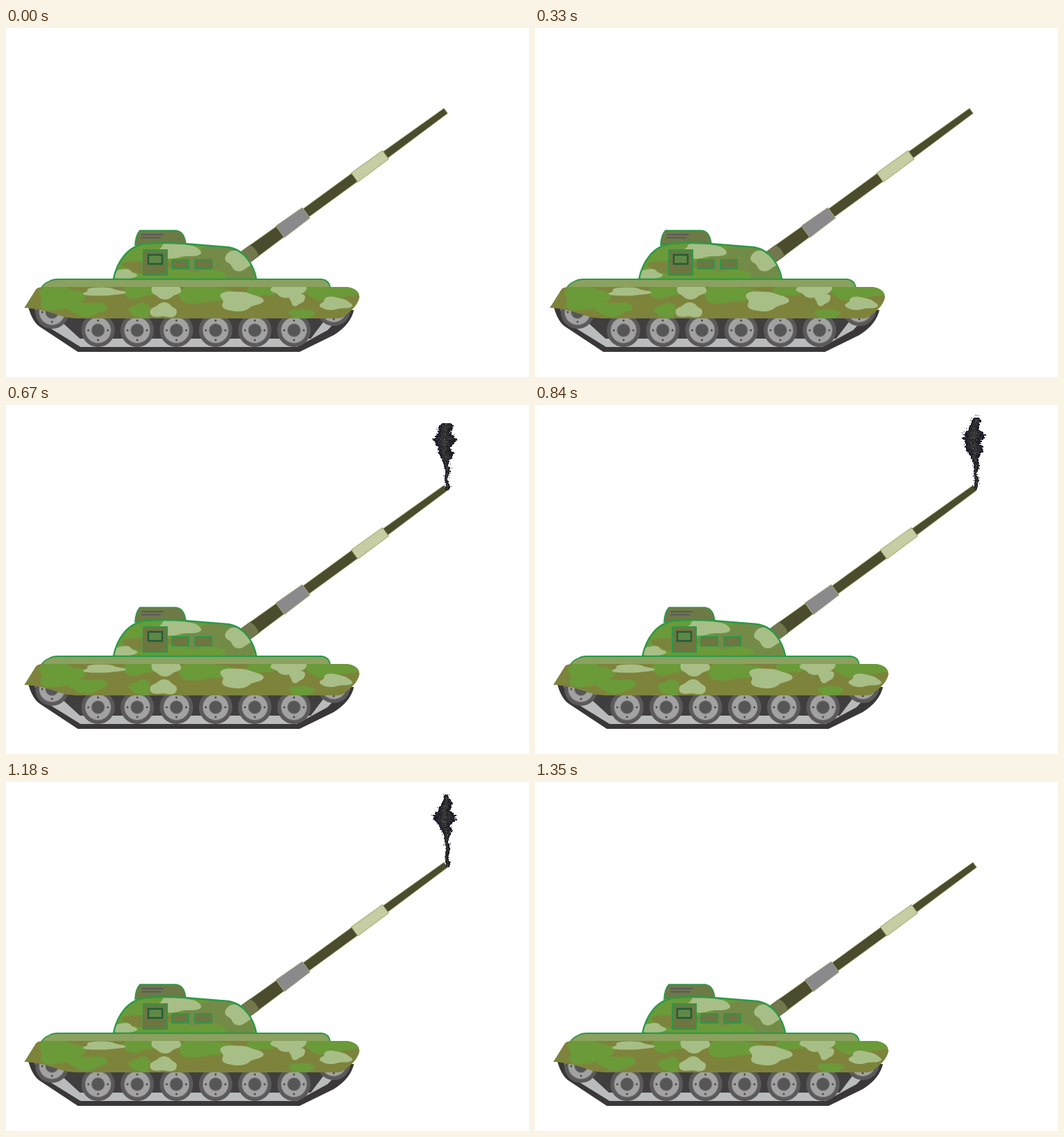
These frames come from a looping animation (750x500 px, 1.38 s). An HTML page with a canvas:

```html
<!DOCTYPE html>
<html lang="en">
<head>
<meta charset="utf-8">
<title>Tank firing</title>
<style>
  html, body { margin: 0; width: 100%; height: 100%; overflow: hidden; background: #fff; }
  svg, canvas { position: absolute; left: 0; top: 0; width: 750px; height: 500px; }
</style>
</head>
<body>
<svg viewBox="0 0 750 500">
  <defs>
    <path id="skirt" d="M26 401L43 374Q46 371 52 371H486C500 371 507 378 507 386C505 396 497 405 482 415Q480 416 474 416H100C76 416 64 403 26 401Z"/>
    <path id="dome" d="M154 360C159 336 174 311 202 309Q225 307 256 309L318 314C343 317 356 342 359 360Z"/>
    <clipPath id="skirtClip"><use href="#skirt"/></clipPath>
    <clipPath id="domeClip"><use href="#dome"/></clipPath>
    <g id="wheel">
      <circle r="24" fill="#5b595a"/>
      <circle r="18.5" fill="#a2a2a3" stroke="#777677"/>
      <circle r="9.5" fill="#575656" stroke="#8a898a"/>
      <circle r="14" fill="none" stroke="#4a4849" stroke-width="3" stroke-linecap="round" pathLength="4" stroke-dasharray="0 1"/>
    </g>
  </defs>

  <g id="tank">
    <g transform="translate(356 319) rotate(-36.1)" stroke="#a9aa70" stroke-width=".8">
      <path fill="#4a4c2d" d="M0 -10L46 -9.400V9.400L0 10ZM92 -7.200H178V7.200H92ZM233 -5.700L340 -4.500V4.500L233 5.700Z"/>
      <path fill="#8a898c" d="M46 -10.300L92 -9.300V9.300L46 10.300Z"/>
      <path fill="#c6cda3" stroke="#8f9650" d="M178 -8L233 -7.500V7.500L178 8Z"/>
      <path fill="#72784c" stroke="#55592f" d="M-20 -10L0 -10Q5 0 1 10L-20 10Z"/>
    </g>

    <path fill="#3a3738" d="M32 400Q38 422 50 429L103 464H421L470 440Q494 425 499 404Z"/>
    <path fill="#b9bbbc" d="M41 403L52 423L107 457H417L461 433L486 407Z"/>
    <path fill="#403e3f" d="M70 412H462L437 445H106Z"/>
    <use href="#wheel" x="66" y="407"/>
    <use href="#wheel" x="470" y="403"/>
    <g id="wheels"></g>

    <path fill="#6d7a45" stroke="#2b9a48" stroke-width="1.6" d="M185 311Q186 296 192 290H244C254 291 257 301 258 310Z"/>
    <path stroke="#5b5665" stroke-width="2" d="M194 296H226M194 300.500H222"/>

    <g id="domeCamo" clip-path="url(#domeClip)"><use href="#dome" fill="#6b9a39"/></g>
    <use href="#dome" fill="none" stroke="#2b9a48" stroke-width="2.4"/>
    <g fill="#6d7641" stroke="#2f9548" stroke-width="2">
      <path d="M197 318H231V354H197ZM238 332H262V345H238ZM271 332H295V345H271Z"/>
      <path fill="#5f8746" stroke="#205c35" stroke-width="2.4" d="M204 325H224V338H204Z"/>
    </g>

    <path fill="#8ba15f" stroke="#2b9a48" stroke-width="1.8" d="M51 372Q54 366 62 363Q67 360 74 360H453Q463 361 465 372Z"/>
    <g id="skirtCamo" clip-path="url(#skirtClip)"><use href="#skirt" fill="#7e833b"/></g>
  </g>
</svg>
<canvas id="smoke" width="750" height="500"></canvas>

<script>
const LOOP = 1380, MUZZLE = 122;
const GREEN = '#6b9a39', LIGHT = '#a8be87', OLIVE = '#7c833c', MOSS = '#748b48';
const byId = id => document.getElementById(id);
const ctx = byId('smoke').getContext('2d');

function add(parent, tag, attrs) {
  const el = document.createElementNS('http://www.w3.org/2000/svg', tag);
  for (const name in attrs) el.setAttribute(name, attrs[name]);
  byId(parent).append(el);
}

// A wavy oval patch of camouflage.
function patch(parent, fill, x, y, rx, ry) {
  const points = [];
  for (let a = 0; a < 2 * Math.PI; a += 0.1) {
    const r = 1 + 0.14 * Math.sin(3 * a + x) + 0.06 * Math.sin(5 * a + y);
    points.push([x + rx * r * Math.cos(a), y + ry * r * Math.sin(a)]);
  }
  add(parent, 'polygon', { fill, points: points.join(' ') });
}

for (let i = 0; i < 6; i++) add('wheels', 'use', { href: '#wheel', x: 132 + 56.2 * i, y: 433 });

patch('domeCamo', MOSS, 312, 338, 52, 30);
patch('domeCamo', OLIVE, 205, 342, 34, 11);
patch('domeCamo', GREEN, 288, 355, 30, 8);
patch('domeCamo', LIGHT, 246, 319, 31, 11);
patch('domeCamo', LIGHT, 170, 353, 16, 7);
patch('domeCamo', LIGHT, 336, 332, 21, 14);

patch('skirtCamo', GREEN, 77, 386, 32, 18);
patch('skirtCamo', GREEN, 116, 402, 28, 10);
patch('skirtCamo', GREEN, 190, 376, 24, 11);
patch('skirtCamo', GREEN, 193, 405, 15, 11);
patch('skirtCamo', GREEN, 284, 381, 40, 13);
patch('skirtCamo', GREEN, 365, 375, 20, 10);
patch('skirtCamo', GREEN, 467, 376, 43, 13);
patch('skirtCamo', GREEN, 424, 411, 17, 9);
patch('skirtCamo', LIGHT, 139, 378, 28, 6);
patch('skirtCamo', LIGHT, 229, 377, 21, 10);
patch('skirtCamo', LIGHT, 226, 405, 19, 10);
patch('skirtCamo', LIGHT, 335, 391, 29, 14);
patch('skirtCamo', LIGHT, 405, 376, 25, 9);
patch('skirtCamo', LIGHT, 417, 388, 11, 9);
patch('skirtCamo', LIGHT, 472, 395, 22, 9);

function random(seed) {
  return () => (seed = seed * 16807 % 2147483647) / 2147483647;
}

// Speckled column: shape(y) gives [centre, half width], color(depth, rnd) its tone.
function plume(top, bottom, shape, color, seed) {
  const rnd = random(seed);
  const dot = (x, y, size, depth) => {
    ctx.fillStyle = color(depth, rnd());
    ctx.fillRect(Math.round(x), Math.round(y), size, size);
  };
  for (let y = top; y < bottom; y++) {
    const [x, w] = shape(y);
    const edge = w * (0.8 + rnd() * 0.3);
    for (let d = -edge; d < edge; d++) dot(x + d, y, rnd() < 0.5 ? 1 : 2, 1 - Math.abs(d) / edge);
    if (rnd() < 0.5) dot(x + (rnd() - 0.5) * (w * 2 + 6), y - rnd() * 5, 1, 0);
  }
}

const soot = (depth, r) => {
  const l = 18 + 48 * depth * r + 22 * r;
  return `rgb(${l + 3} ${l + 4 * depth} ${l + 14 * (1 - depth)})`;
};
const ember = (depth, r) => `rgb(${180 + 65 * r} ${85 + 70 * r + 60 * depth} ${45 + 75 * depth})`;

const billow = y => {
  const a = 2 * Math.PI * (y - 18) / 37;
  return [627 + 6 * Math.cos(a), 10.5 + 4.5 * Math.cos(a)];
};
const flame = y => [632 + Math.sin(y / 4), 1 + 4 * Math.sin(Math.PI * (y - 88) / 35)];
const wisp = age => y => {
  const body = Math.exp(-(((y - 50) / (25 - 2 * age)) ** 2));
  const ripple = Math.sin(y / 3.5 + age * 2);
  return [632 - 4 * body + ripple, (2 + 11.5 * body) * (1 + 0.22 * ripple)];
};

function show(phase) {
  byId('tank').setAttribute('transform', `translate(${phase === 1 ? -5 : 0} 0)`);
  ctx.clearRect(0, 0, 750, 500);
  if (phase === 2) {
    plume(1, 101, billow, soot, 71);
    plume(89, MUZZLE, flame, ember, 23);
  } else if (phase > 2 && phase < 7) {
    const age = phase - 3;
    plume(22 + 4 * Math.cos(Math.PI * age), MUZZLE - 1, wisp(age), soot, phase * 997);
  }
}

let current = -1;
function tick(now) {
  const t = now % LOOP;
  const phase = t < 330 ? 0 : 1 + Math.floor((t - 330) / 170);
  if (phase !== current) show(current = phase);
  requestAnimationFrame(tick);
}
tick(performance.now());
</script>
</body>
</html>
```
